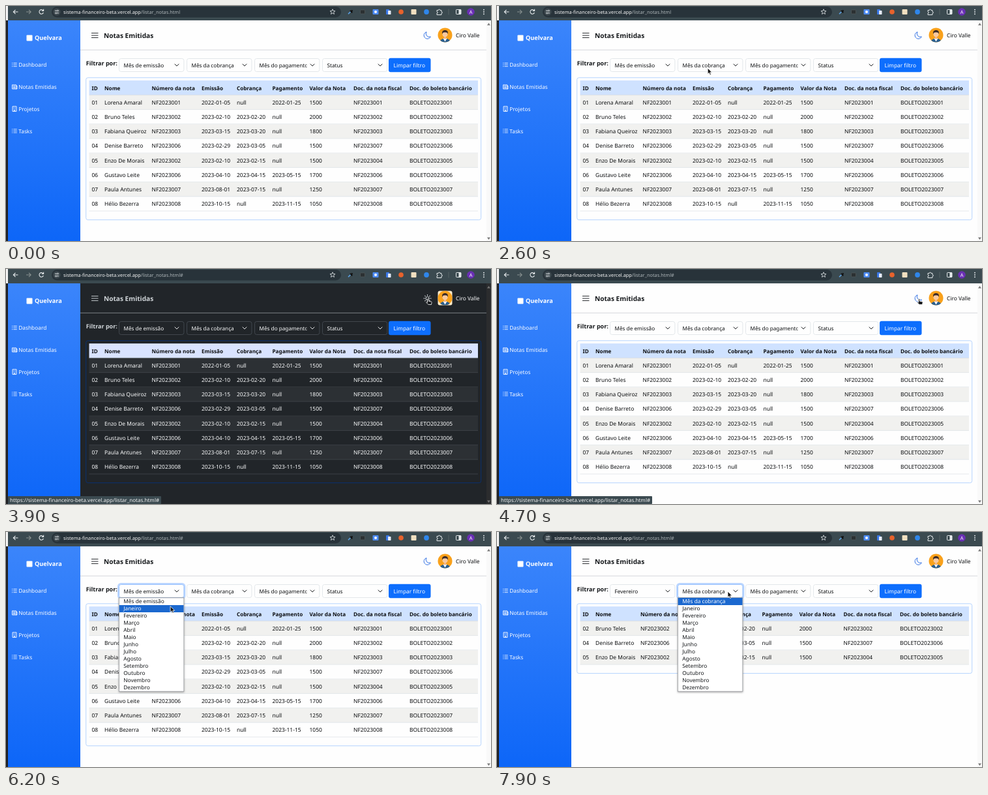
These frames come from a looping animation (744x360 px, 8000 ms). An HTML page:

```html
<!DOCTYPE html>
<html lang="pt-BR">
<head>
<meta charset="utf-8">
<title>Notas Emitidas</title>
<style>
html, body { margin: 0; width: 100%; height: 100%; overflow: hidden; }
svg {
  display: block; width: 744px; height: 360px;
  font-family: "Noto Sans", "Open Sans", sans-serif; font-weight: 500;
  text-rendering: geometricPrecision;
  --bg: #fefefe; --text: #0c0e10; --title: #15181b; --line: #dee2e6; --rule: #d5d8db;
  --stripe: #f1f1ef; --card: #b6d4fe; --head: #cfe2ff; --bar: #f9f9f9; --field: #dee2e6;
}
svg.dark {
  --bg: #212529; --text: #fafbfc; --title: #d0d5d9; --line: #43484d; --rule: #7b8085;
  --stripe: #2c3034; --card: #0a3070; --head: #d9e3ff; --bar: #2b2c2e; --field: #495057;
}
text { white-space: pre; }
.bold { font-weight: 700; }
.semi { font-weight: 600; }
.thin { font-weight: 400; }
</style>
</head>
<body>
<svg id="stage" viewBox="0 0 744 360">
  <defs>
    <linearGradient id="blue" x1="0" y1="0" x2="0" y2="1">
      <stop offset="0" stop-color="#3b85fb"/><stop offset="1" stop-color="#0d66f8"/>
    </linearGradient>
    <filter id="soft" x="-20%" y="-20%" width="140%" height="140%">
      <feDropShadow dx="0" dy="1" stdDeviation="1.5" flood-opacity=".35"/>
    </filter>
    <clipPath id="fieldClip"><rect x="381" y="80" width="80.5" height="22"/></clipPath>
    <clipPath id="faceClip"><circle cx="673.5" cy="44.5" r="11"/></clipPath>
  </defs>
</svg>
<script>
const stage = document.getElementById('stage');
const LOOP = 8000, STEP = 100;
const CHROME = '#3b4a50', PILL = '#28333a';

function add(parent, tag, attrs, content) {
  const el = document.createElementNS('http://www.w3.org/2000/svg', tag);
  for (const k in attrs) el.setAttribute(k, attrs[k]);
  if (content !== undefined) el.textContent = content;
  parent.appendChild(el);
  return el;
}
const group = (parent = stage) => add(parent, 'g', {});
const rect = (p, x, y, width, height, fill, more) => add(p, 'rect', { x, y, width, height, fill, ...more });
const circle = (p, cx, cy, r, fill, more) => add(p, 'circle', { cx, cy, r, fill, ...more });
const text = (p, x, y, str, size, fill, more) => add(p, 'text', { x, y, 'font-size': size, fill, ...more }, str);
const line = (p, d, stroke, width = 1, more) =>
  add(p, 'path', { d, fill: 'none', stroke, 'stroke-width': width, ...more });
const show = (el, on) => el.setAttribute('visibility', on ? 'visible' : 'hidden');

// Page background and scrollbar
rect(stage, 0, 0, 744, 360, 'var(--bg)');
rect(stage, 737, 21, 7, 339, 'var(--bar)');
add(stage, 'path', { d: 'M738 29.5l2.5-3.5 2.5 3.5zM738 354.5l2.5 3.5 2.5-3.5z', fill: '#777' });

// Browser toolbar
function toolbar() {
  const g = group(), ink = '#e6eaec';
  rect(g, 0, 0, 744, 22, CHROME);
  rect(g, 70, 1, 444, 16.5, PILL, { rx: 8.2 });
  line(g, 'M18.5 9h-7M14.5 5.8L11.3 9l3.2 3.2', ink, 1.1);
  line(g, 'M31 9h7M35 5.8L38.2 9 35 12.2', '#87908f', 1.1);
  line(g, 'M57 7a3.3 3.3 0 1 0 .4 3M57.6 4.8v2.7h-2.7', ink, 1.1);
  circle(g, 78, 9, 5.6, '#3f4a50');
  line(g, 'M75 7.3h3M80 7.3h1M75 10.8h1M78 10.8h3', ink, .9);
  circle(g, 79.2, 7.3, 1, 'none', { stroke: ink, 'stroke-width': .7 });
  circle(g, 76.8, 10.8, 1, 'none', { stroke: ink, 'stroke-width': .7 });
  const url = text(g, 88, 12, '', 7.35, '#f6f6f6', { class: 'thin' });
  add(url, 'tspan', {}, 'sistema-financeiro-beta.vercel.app');
  const path = add(url, 'tspan', { fill: '#adb5b8' }, '');
  const star = [...Array(10).keys()].map(i => {
    const a = i * Math.PI / 5, r = i % 2 ? 1.8 : 4.2;
    return `${501 + r * Math.sin(a)} ${9 - r * Math.cos(a)}`;
  });
  line(g, `M${star.join('L')}Z`, ink, .8);
  line(g, 'M525 12.3l4-4', '#5ca4e8', 1.6);
  line(g, 'M528 7l3.2 3.2M529.5 8.5l2-2', '#111', 2);
  rect(g, 543.5, 6, 7, 6, '#2b3032', { rx: 1, stroke: '#555c5c', 'stroke-width': .7 });
  rect(g, 562.5, 5, 9, 8, '#4d8bf5', { rx: 1 });
  circle(g, 567, 9, 2, '#fff');
  rect(g, 583, 5, 5, 8, '#3b78e7', { rx: .7 });
  rect(g, 586, 7, 4.5, 6, '#e7edf9', { rx: .7 });
  circle(g, 606, 9, 3.8, '#e8622c');
  rect(g, 621.5, 5, 8, 8, '#f0dfc0', { rx: 1 });
  circle(g, 645, 9, 3.9, '#2f86ea');
  line(g, 'M661 6.5h2.3a1.3 1.3 0 0 1 2.6 0h2v2.2a1.3 1.3 0 0 1 0 2.6v2.2H661v-2.3a1.2 1.2 0 0 0 0-2.4z', ink, 1);
  line(g, 'M679 4.5v9', '#5d6a6e', .8);
  rect(g, 690.5, 5.5, 7.5, 7, 'none', { rx: .7, stroke: ink });
  rect(g, 694.5, 5.5, 3.5, 7, ink);
  circle(g, 713, 9, 5.8, '#6a2fb5');
  text(g, 713, 11.7, 'A', 7.4, '#fff', { 'text-anchor': 'middle' });
  for (const y of [5.8, 9, 12.2]) circle(g, 733, y, .95, ink);
  return path;
}

function sidebar() {
  const g = group();
  rect(g, 0, 0, 3, 22, '#f4f4f4');
  rect(g, 0, 22, 3, 338, '#202124');
  rect(g, 3, 22, 111, 338, 'url(#blue)');
  rect(g, 31.5, 44.5, 9, 9, '#fff', { rx: 1 });
  text(g, 44, 52.2, 'Quelvara', 9.2, '#fff', { class: 'bold' });
  ['Dashboard', 'Notas Emitidas', 'Projetos', 'Tasks'].forEach((label, i) => {
    const y = 90 + i * 33.8;
    if (i === 1) {
      line(g, `M9.5 ${y - 3}h6v6.2h-6zM15.5 ${y - 1.5}h1.5v4.7h-2M10.8 ${y - 1.2}h3.4M10.8 ${y + .5}h3.4M10.8 ${y + 2}h3.4`, '#fff', .9);
    } else if (i === 2) {
      line(g, `M10 ${y - 3.8}h6v7.6h-6zM12.3 ${y + 3.8}v-2h1.4v2M11.5 ${y - 2}h1M13.5 ${y - 2}h1M11.5 ${y}h1M13.5 ${y}h1`, '#fff', .9);
    } else {
      line(g, `M9 ${y - 2.6}h1.2M9 ${y}h1.2M9 ${y + 2.6}h1.2M11.4 ${y - 2.6}h5.4M11.4 ${y}h5.4M11.4 ${y + 2.6}h5.4`, '#fff', .8);
    }
    text(g, 19.3, y + 3.1, label, 8.3, '#fff');
  });
}

function header() {
  const g = group();
  line(g, 'M131 41.5h10.5M131 45h10.5M131 48.5h10.5', 'var(--title)', .9);
  text(g, 150, 48.6, 'Notas Emitidas', 10.1, 'var(--title)', { class: 'semi' });
  line(g, 'M114 67.3H737', 'var(--rule)', 1);
  const moon = line(g, 'M645 39.8a5.3 5.3 0 1 0 6.3 7.2a5 5 0 0 1-6.3-7.2z', '#2f6fe4', 1);
  const sun = group(g);
  circle(sun, 646.5, 45, 2.6, 'none', { stroke: '#dfe3e6', 'stroke-width': 1 });
  for (let a = 0; a < 360; a += 45)
    line(sun, 'M646.5 41v-2', '#dfe3e6', 1, { transform: `rotate(${a} 646.5 45)` });
  const corners = rect(g, 662.5, 33.5, 22, 22, '#fdeccb', { rx: 3 });
  circle(g, 673.5, 44.5, 11, '#f9a11b');
  const man = add(g, 'g', { 'clip-path': 'url(#faceClip)' });
  add(man, 'path', { d: 'M665 57c0-5 3-7 8.5-7s8.5 2 8.5 7z', fill: '#2b5f8f' });
  add(man, 'path', { d: 'M670.5 49.5h6l-3 5z', fill: '#fff' });
  rect(man, 672, 46, 3, 4.5, '#efb58b');
  circle(man, 673.5, 43.3, 4, '#f8c9a0');
  add(man, 'path', { d: 'M669.2 43c-.8-4 1.2-6 4.3-6s5.1 2 4.3 6c-.7-2-1.5-2.7-4.3-2.7s-3.6.7-4.3 2.7z', fill: '#3a2a28' });
  text(g, 690, 48.3, 'Ciro Valle', 8.4, 'var(--text)');
  return { moon, sun, corners };
}

function filters() {
  const g = group();
  text(g, 122.8, 91.4, 'Filtrar por:', 9, 'var(--title)', { class: 'semi' });
  const fields = ['Mês de emissão', 'Mês da cobrança', 'Mês do pagamento', 'Status'].map((label, i) => {
    const x = 173.5 + i * 104;
    const glow = rect(g, x - 1.3, 79.2, 102, 22.6, 'none', { rx: 4, stroke: '#0d6efd', 'stroke-opacity': .28, 'stroke-width': 2.4 });
    const box = rect(g, x, 80.5, 99.4, 20, 'var(--bg)', { rx: 3, 'stroke-width': .8 });
    const clip = add(g, 'g', i === 2 ? { 'clip-path': 'url(#fieldClip)' } : {});
    const name = text(clip, x + 7, 93.6, label, 8.2, 'var(--text)');
    line(g, `M${x + 85.5} 89l3 3 3-3`, 'var(--text)', .9, { 'stroke-linecap': 'round' });
    return { name, focus(on) {
      show(glow, on);
      box.setAttribute('stroke', on ? '#86b7fe' : 'var(--field)');
    } };
  });
  rect(g, 587, 79.8, 64.5, 21.4, '#0d6efd', { rx: 3 });
  text(g, 594.5, 93.6, 'Limpar filtro', 8.4, '#fff');
  return fields;
}

const heads = ['ID', 'Nome', 'Número da nota', 'Emissão', 'Cobrança', 'Pagamento', 'Valor da Nota', 'Doc. da nota fiscal', 'Doc. do boleto bancário'];
// name, note, issued, charged, paid, value, tax document
const notes = [
  'Lorena Amaral|1|2022-01-05|null|2022-01-25|1500|1',
  'Bruno Teles|2|2023-02-10|2023-02-20|null|2000|2',
  'Fabiana Queiroz|3|2023-03-15|2023-03-20|null|1800|3',
  'Denise Barreto|6|2023-02-29|2023-03-05|null|1500|7',
  'Enzo De Morais|2|2023-02-10|2023-02-15|null|1500|4',
  'Gustavo Leite|6|2023-04-10|2023-04-15|2023-05-15|1700|6',
  'Paula Antunes|7|2023-08-01|2023-07-15|null|1250|7',
  'Hélio Bezerra|8|2023-10-15|null|2023-11-15|1050|8'
].map((row, i) => {
  const [name, note, issued, charged, paid, value, doc] = row.split('|');
  const slip = i === 3 ? 6 : i + 1;
  return [`0${i + 1}`, name, `NF202300${note}`, issued, charged, paid, value, `NF202300${doc}`, `BOLETO202300${slip}`];
});

function table(rows, cols) {
  const g = group(), pitch = 22.2, top = 136.4, bottom = top + rows.length * pitch;
  rect(g, 122.7, 109.8, 606, bottom + 13.6 - 109.8, 'none', { rx: 3, stroke: 'var(--card)' });
  rect(g, 127.5, 114.1, 596.5, 22.3, 'var(--head)');
  heads.forEach((h, c) => text(g, cols[c], 128.6, h, 8.15, '#0c0e10', { class: 'bold' }));
  line(g, `M127.5 ${top}H724`, 'var(--rule)', .8);
  rows.forEach((row, r) => {
    const y = top + r * pitch;
    if (r % 2 === 0) rect(g, 127.5, y + .4, 596.5, pitch - .4, 'var(--stripe)');
    line(g, `M127.5 ${y + pitch}H724`, 'var(--line)', .8);
    row.forEach((cell, c) => text(g, cols[c], y + 14.3, cell, 8.45, 'var(--text)'));
  });
  return g;
}

const months = ['Janeiro', 'Fevereiro', 'Março', 'Abril', 'Maio', 'Junho', 'Julho', 'Agosto', 'Setembro', 'Outubro', 'Novembro', 'Dezembro'];
function popup(x, title) {
  const g = group();
  rect(g, x, 100.8, 99.6, 143.4, '#fff', { stroke: '#8a8d91', 'stroke-width': .8, filter: 'url(#soft)' });
  const mark = rect(g, x + .4, 0, 98.8, 11, '#1b68cf');
  const items = [title, ...months].map((m, i) => text(g, x + 7, 109.3 + i * 11, m, 8.3));
  return { g, pick(n) {
    mark.setAttribute('y', 101 + n * 11);
    items.forEach((el, i) => el.setAttribute('fill', i === n ? '#fff' : '#15181b'));
  } };
}

function statusBar() {
  const g = group();
  rect(g, 3, 348, 235, 12, CHROME, { rx: 1 });
  text(g, 6, 357, 'https://sistema-financeiro-beta.vercel.app/listar_notas.html#', 8.05, '#f6f6f6', { class: 'thin' });
  return g;
}

function pointers() {
  const g = group();
  const edge = { stroke: '#fff', 'stroke-width': .8, 'stroke-linejoin': 'round' };
  const arrow = add(g, 'path', { d: 'M0 0v9.2l2.1-1.9 1.5 3.3 1.6-.7-1.5-3.2h2.9z', fill: '#111', ...edge });
  const hand = add(g, 'path', {
    d: 'M0 0q1-1 1.8 0v3.2l4 .8q1 .3.8 1.5l-.7 3H1.4L-1.9 5.2q.2-1.2 1.9 0z', fill: '#15171a', ...edge });
  const beam = line(g, 'M-1.6-4h3.2M0-4v8M-1.6 4h3.2', '#444', .9);
  return { g, arrow, hand, beam };
}

const path = toolbar();
sidebar();
const { moon, sun, corners } = header();
const fields = filters();
const full = table(notes, [131.5, 151, 223.5, 300, 354, 408.5, 465.5, 533, 619]);
const few = table([1, 3, 4].map(i => notes[i]), [131.5, 151, 220, 297, 351.8, 406.5, 463.7, 531.5, 618]);
const issueMenu = popup(173.3, 'Mês de emissão');
const chargeMenu = popup(277.3, 'Mês da cobrança');
const status = statusBar();
const mouse = pointers();

// time, x, y
const route = [
  [900, 330, 300], [1500, 251, 106], [2300, 251, 106], [3400, 646.5, 46], [4800, 646.5, 46],
  [5500, 250.5, 91], [5900, 250.5, 91], [6400, 253, 126], [6800, 253, 126], [7400, 354, 91], [8000, 354, 91]
];
function place(t) {
  const i = Math.max(1, route.findIndex(p => p[0] >= t));
  const [a, b] = [route[i - 1], route[i]];
  const k = Math.min(1, Math.max(0, (t - a[0]) / (b[0] - a[0])));
  const e = k * k * (3 - 2 * k);
  return [a[1] + (b[1] - a[1]) * e, a[2] + (b[2] - a[2]) * e];
}

function render(t) {
  const within = (a, b = LOOP) => t >= a && t < b;
  const dark = within(3600, 4700), filtered = within(6500);
  stage.classList.toggle('dark', dark);
  show(moon, !dark);
  show(sun, dark);
  show(corners, dark);
  path.textContent = '/listar_notas.html' + (t >= 3600 ? '#' : '');
  fields[0].name.textContent = filtered ? 'Fevereiro' : 'Mês de emissão';
  fields.forEach((f, i) => f.focus(i === 0 ? within(5900, 7600) : i === 1 && within(7600)));
  show(full, !filtered);
  show(few, filtered);
  show(status, within(3400, 5000));

  const [x, y] = place(t);
  show(issueMenu.g, within(5900, 6500));
  issueMenu.pick(Math.max(0, Math.floor((y - 101) / 11)));
  show(chargeMenu.g, within(7600));
  chargeMenu.pick(0);

  const hand = within(3600, 4900), beam = within(6500, 7000), seen = within(900);
  mouse.g.setAttribute('transform', `translate(${x} ${y})`);
  show(mouse.hand, hand);
  show(mouse.beam, beam);
  show(mouse.arrow, seen && !hand && !beam);
}

const start = performance.now();
let last = -1;
function tick() {
  const t = Math.floor(((performance.now() - start) % LOOP) / STEP) * STEP;
  if (t !== last) render(last = t);
  requestAnimationFrame(tick);
}
tick();
</script>
</body>
</html>
```
